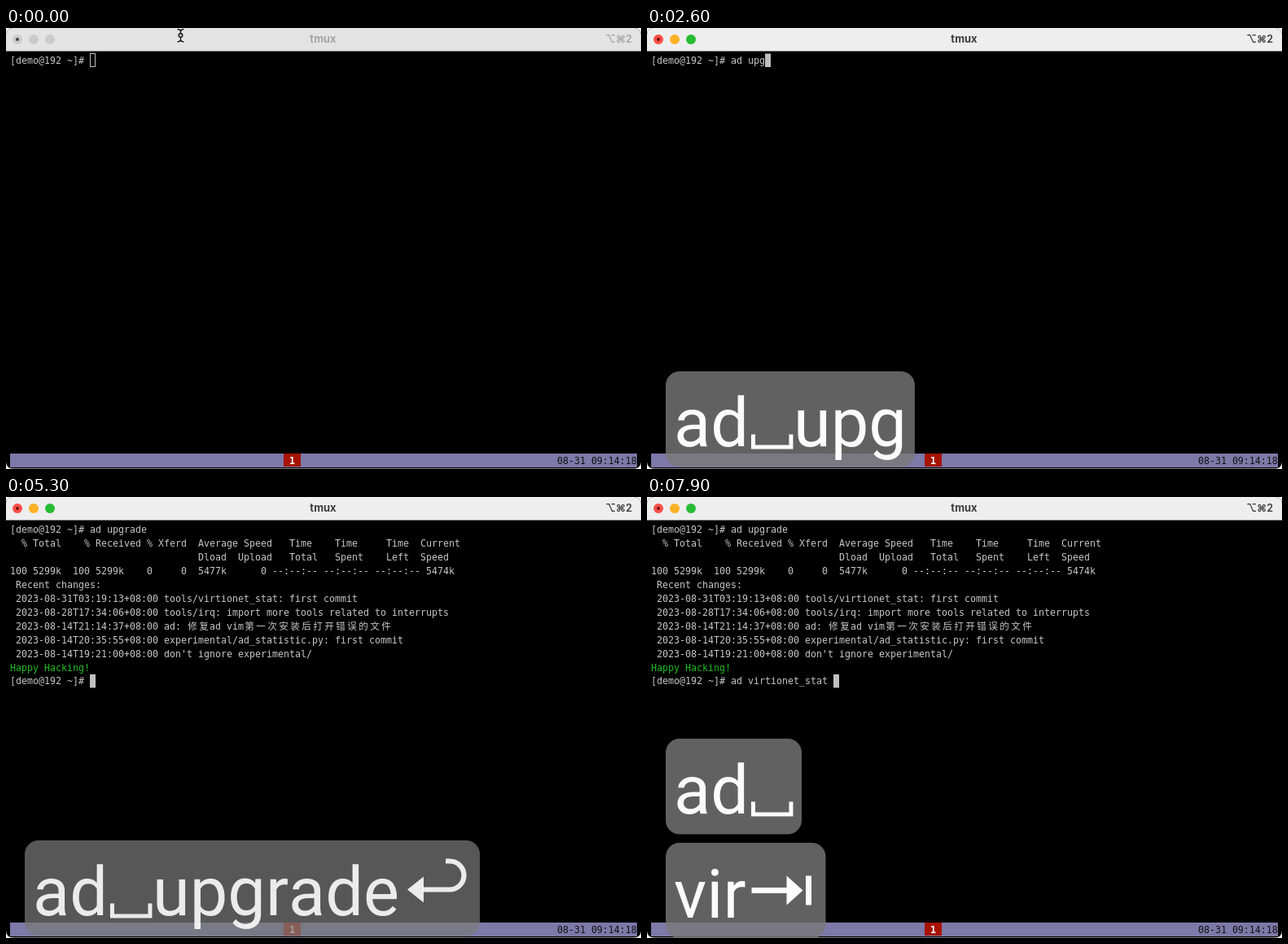
Write an HTML page with a canvas that moves like this. It is 780 by 542 pixels and loops after 8000 ms.

```html
<!DOCTYPE html>
<html lang="en">
<head>
<meta charset="utf-8">
<title>tmux</title>
<style>
  html, body { margin: 0; width: 100%; height: 100%; overflow: hidden; background: #fff; }
  canvas { display: block; }
</style>
</head>
<body>
<canvas id="stage" width="780" height="542"></canvas>
<script>
const ctx = document.getElementById('stage').getContext('2d');
const LOOP = 8000, CELL = 7, ROW = 16.95, LEFT = 5, TOP = 31.5;
const MONO = '"DejaVu Sans Mono", "Noto Sans CJK SC", "Noto Sans CJK", monospace';
const TITLE = 'Inter, "DejaVu Sans", sans-serif';
const KEY_FONT = '83px Roboto, sans-serif';
const FG = '#c6c6c6', GREEN = '#20bd20';
const ACTIVATE = 200, POINTER_GONE = 500;
const PROMPT = '[demo@192 ~]# ';

const HEADER = [
  '  % Total    % Received % Xferd  Average Speed   Time    Time     Time  Current',
  '                                 Dload  Upload   Total   Spent    Left  Speed',
];
const WAITING = '  0     0    0     0    0     0      0      0 --:--:-- --:--:-- --:--:--     0';
const DONE = '100 5299k  100 5299k    0     0  5477k      0 --:--:-- --:--:-- --:--:-- 5474k';
const CHANGES = [
  ' Recent changes:',
  ' 2023-08-31T03:19:13+08:00 tools/virtionet_stat: first commit',
  ' 2023-08-28T17:34:06+08:00 tools/irq: import more tools related to interrupts',
  ' 2023-08-14T21:14:37+08:00 ad: 修复ad vim第一次安装后打开错误的文件',
  ' 2023-08-14T20:35:55+08:00 experimental/ad_statistic.py: first commit',
  " 2023-08-14T19:21:00+08:00 don't ignore experimental/",
  'Happy Hacking!',
];

// Each group of keystrokes shares one overlay panel.
const keys = (text, times) => [...text].map((ch, i) => ({ ch, time: times[i] }));
const groups = [
  keys('ad␣upgrade⏎', [1700, 1900, 2100, 2400, 2500, 2600, 2700, 2850, 3000, 3100, 3200]),
  keys('ad␣', [5900, 6100, 6300]),
  keys('vir⇥', [7200, 7300, 7400, 7700]),
];
const typed = (group, t) => group.filter(k => k.time <= t).map(k => k.ch).join('');

function drawLine(text, row, color = FG) {
  let x = LEFT;
  const y = 44 + row * ROW;
  ctx.fillStyle = color;
  for (const ch of text) {
    const wide = ch > '\u2e80';
    ctx.font = (wide ? 11.6 : 11.6) + 'px ' + MONO;
    ctx.fillText(ch, x + (wide ? 1.2 : 0), y);
    x += wide ? 2 * CELL : CELL;
  }
  return x;
}

function terminalLines(t) {
  const first = typed(groups[0], t);
  const lines = [PROMPT + first.replace('␣', ' ').replace('⏎', '')];
  if (!first.endsWith('⏎')) return lines;
  if (t < 3500) return [...lines, ''];
  lines.push(...HEADER, t < 4500 ? WAITING : DONE);
  if (t < 4600) return lines;
  const command = (typed(groups[1], t) + typed(groups[2], t))
    .replace('␣', ' ').replace('vir⇥', 'virtionet_stat ');
  return [...lines, ...CHANGES, PROMPT + command];
}

function drawTerminal(t, active) {
  const lines = terminalLines(t);
  let x = LEFT;
  lines.forEach((line, i) => {
    x = drawLine(line, i, line === 'Happy Hacking!' ? GREEN : FG);
  });
  const y = TOP + (lines.length - 1) * ROW;
  if (active) {
    ctx.fillStyle = '#bfbfbf';
    ctx.fillRect(x, y, CELL, 16.5);
  } else {
    ctx.strokeStyle = '#bfbfbf';
    ctx.lineWidth = 1;
    ctx.strokeRect(x + 0.5, Math.round(y) - 0.5, CELL - 1, 16);
  }
}

function drawStatus() {
  ctx.fillStyle = '#7d79a8';
  ctx.fillRect(5, 523, 770, 17);
  ctx.fillStyle = '#a61400';
  ctx.fillRect(341, 523, 21, 16);
  ctx.fillStyle = '#fff';
  ctx.font = 'bold 11.6px ' + MONO;
  ctx.fillText('1', 348, 536);
  ctx.fillStyle = '#111';
  ctx.font = '11.6px ' + MONO;
  ctx.fillText('08-31 09:14:18', 677, 536);
}

function disc(x, y, r, color) {
  ctx.fillStyle = color;
  ctx.beginPath();
  ctx.arc(x, y, r, 0, 2 * Math.PI);
  ctx.fill();
}

function drawTitleBar(active) {
  ctx.fillStyle = active ? '#efeeef' : '#e3e3e3';
  ctx.fillRect(0, 0, 780, 28);
  ctx.fillStyle = '#777';
  ctx.fillRect(0, 28, 780, 1);
  const lights = active ? ['#fd4f47', '#fdb225', '#28bd35'] : ['#cbcbcb', '#cbcbcb', '#cbcbcb'];
  lights.forEach((color, i) => disc(14 + 20 * i, 14, 6, color));
  disc(14, 14, 2, active ? '#700c08' : '#444');
  ctx.fillStyle = active ? '#3b3b3b' : '#a4a4a4';
  ctx.font = 'bold 13px ' + TITLE;
  ctx.textAlign = 'center';
  ctx.fillText('tmux', 389.5, 18);
  ctx.font = '600 12.5px ' + TITLE;
  ctx.textAlign = 'right';
  ctx.fillText('⌥⌘2', 769, 17.5);
  ctx.textAlign = 'left';
}

function drawPointer() {
  const shape = new Path2D('M210.5 1.5Q214.5 1.5 214.5 5V13.5Q214.5 17 210.5 17M218.5 1.5Q214.5 1.5 214.5 5M214.5 13.5Q214.5 17 218.5 17');
  for (const [color, width] of [['#fff', 3], ['#111', 1.5]]) {
    ctx.strokeStyle = color;
    ctx.lineWidth = width;
    ctx.stroke(shape);
  }
  disc(214.5, 9, 3, '#111');
  disc(214.5, 9, 1.5, '#eee');
}

// Key symbols, relative to the pen position on the baseline.
const symbols = {
  '␣': { advance: 55, width: 5, line: 'M5.5 -14V1.5H52V-14', head: '' },
  '⏎': { advance: 89, width: 6.2, line: 'M29 -31H62A17.5 17.5 0 0 0 62 -66H57', head: 'M10 -31L30 -47V-15Z' },
  '⇥': { advance: 88, width: 7, line: 'M7 -33H51M77 -51V-15', head: 'M50 -51L70 -33L50 -15Z' },
};

function advance(ch) {
  return symbols[ch] ? symbols[ch].advance : ctx.measureText(ch).width;
}

function drawPanel(text, top, alpha) {
  ctx.save();
  ctx.globalAlpha = alpha;
  ctx.font = KEY_FONT;
  const width = [...text].reduce((sum, ch) => sum + advance(ch), 20);
  ctx.fillStyle = 'rgba(122,122,122,0.8)';
  ctx.beginPath();
  ctx.roundRect(23, top, width, 117.5, 17);
  ctx.fill();
  ctx.fillStyle = ctx.strokeStyle = '#fcfcfc';
  ctx.translate(33, top + 91.5);
  for (const ch of text) {
    const symbol = symbols[ch];
    if (symbol) {
      ctx.lineWidth = symbol.width;
      ctx.stroke(new Path2D(symbol.line));
      ctx.fill(new Path2D(symbol.head));
    } else {
      ctx.fillText(ch, 0, 0);
    }
    ctx.translate(advance(ch), 0);
  }
  ctx.restore();
}

// A panel lingers two seconds after its last key, then fades for one.
function drawPanels(t) {
  const panels = groups.map(group => {
    const text = typed(group, t);
    const last = text ? group[[...text].length - 1].time : 0;
    return { text, alpha: Math.min(1, 1 - (t - last - 2000) / 1000) };
  }).filter(p => p.text && p.alpha > 0);
  const bottom = panels.length > 1 ? 425 : 422;
  panels.reverse().forEach((p, i) => drawPanel(p.text, bottom - 128 * i, p.alpha));
}

function draw(t) {
  const active = t >= ACTIVATE;
  ctx.fillStyle = '#fff';
  ctx.fillRect(0, 0, 780, 542);
  ctx.save();
  ctx.beginPath();
  ctx.roundRect(0, 0, 780, 541.5, 8);
  ctx.clip();
  ctx.fillStyle = '#000';
  ctx.fillRect(0, 0, 780, 542);
  drawTitleBar(active);
  drawTerminal(t, active);
  drawStatus();
  ctx.restore();
  if (t < POINTER_GONE) drawPointer();
  drawPanels(t);
}

const start = performance.now();
function frame() {
  draw((performance.now() - start) % LOOP);
  requestAnimationFrame(frame);
}
frame();
</script>
</body>
</html>
```
